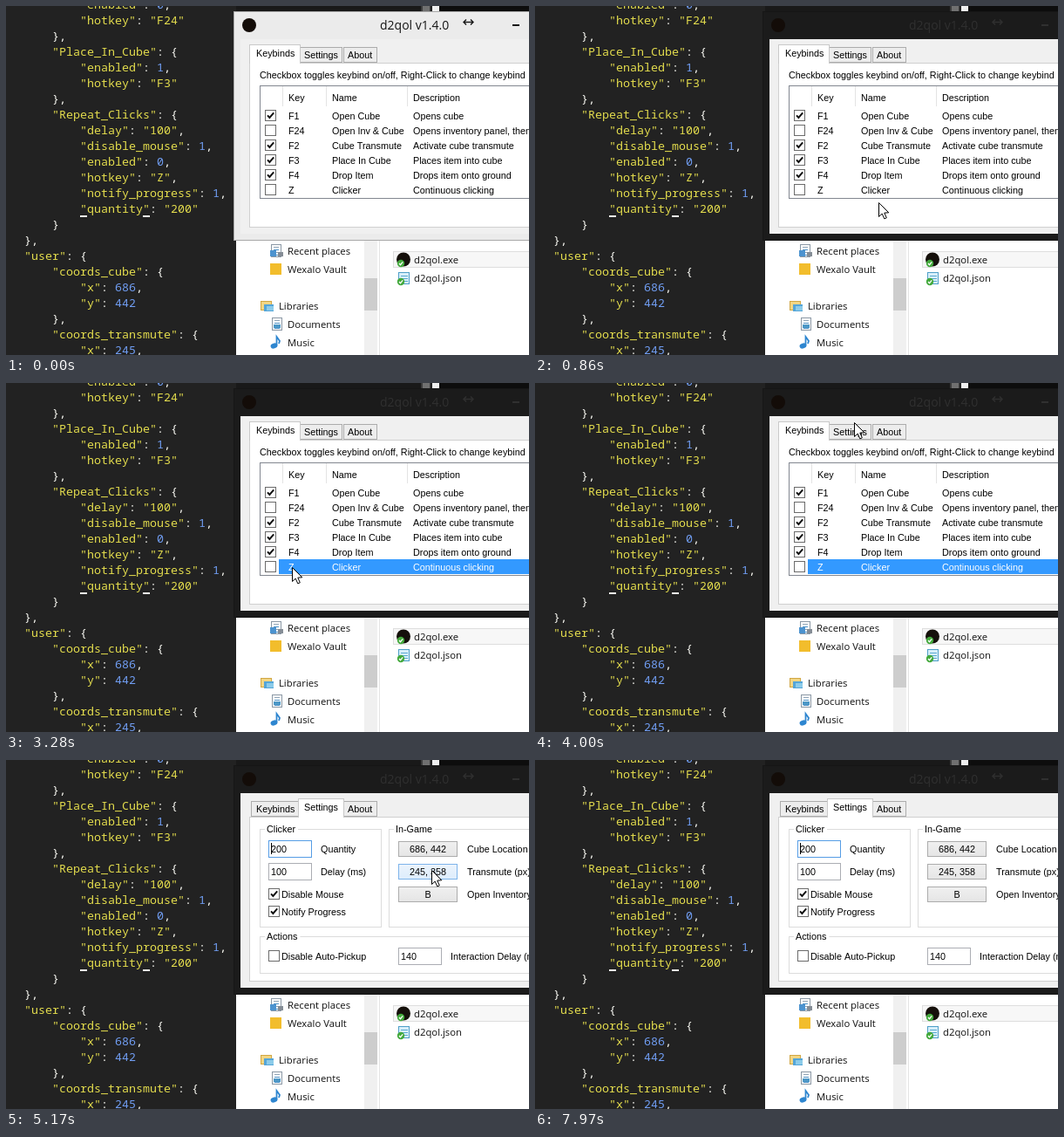
An HTML page with a canvas for the animation above (8 s loop, 600 by 400 pixels).

```html
<!DOCTYPE html>
<html lang="en">
<head>
<meta charset="utf-8">
<title>Keybind settings demo</title>
<style>
html, body { margin: 0; width: 100%; height: 100%; overflow: hidden; background: #222; }
canvas { display: block; width: 600px; height: 400px; }
</style>
</head>
<body>
<canvas id="stage"></canvas>
<script>
const LOOP = 8000;
const canvas = document.getElementById('stage');
const ctx = canvas.getContext('2d');
const dpr = window.devicePixelRatio || 1;
canvas.width = 600 * dpr;
canvas.height = 400 * dpr;

const MONO = '13.333px "Noto Sans Mono", "DejaVu Sans Mono", monospace';
const UI = '10.8px "Liberation Sans", Arial, sans-serif';
const SHELL = '11.3px "Open Sans", "Noto Sans", sans-serif';
const TITLE = '14px "Open Sans", "Noto Sans", sans-serif';

const CODE = `        "enabled": 0,
        "hotkey": "F24"
    },
    "Place_In_Cube": {
        "enabled": 1,
        "hotkey": "F3"
    },
    "Repeat_Clicks": {
        "delay": "100",
        "disable_mouse": 1,
        "enabled": 0,
        "hotkey": "Z",
        "notify_progress": 1,
        "quantity": "200"
    }
},
"user": {
    "coords_cube": {
        "x": 686,
        "y": 442
    },
    "coords_transmute": {
        "x": 245,`.split('\n');

const ROWS = [
  [1, 'F1', 'Open Cube', 'Opens cube'],
  [0, 'F24', 'Open Inv & Cube', 'Opens inventory panel, then closes'],
  [1, 'F2', 'Cube Transmute', 'Activate cube transmute'],
  [1, 'F3', 'Place In Cube', 'Places item into cube'],
  [1, 'F4', 'Drop Item', 'Drops item onto ground'],
  [0, 'Z', 'Clicker', 'Continuous clicking'],
];

// Pointer path: time, x, y
const PATH = [
  [40, 592, 392], [250, 500, 322], [600, 394, 225],
  [1110, 394, 225], [1180, 386, 219],
  [1440, 386, 219], [1820, 332, 212],
  [2520, 332, 212], [2690, 346, 214],
  [2830, 346, 214], [3020, 328, 211],
  [3670, 328, 211], [3850, 352, 122], [4000, 366, 45],
  [4150, 366, 45], [4260, 402, 50],
  [4480, 402, 50], [4700, 368, 55],
  [4930, 368, 55], [5060, 430, 92], [5170, 488, 126],
  [5220, 488, 126], [5400, 496, 125], [5580, 478, 120], [5770, 502, 108],
  [5820, 504, 106], [5940, 509, 101], [6160, 466, 99],
  [6270, 466, 99], [6340, 468, 101],
  [6980, 468, 101], [7300, 520, 76], [7660, 578, 41],
  [7810, 578, 41], [7930, 600, 39],
];
const CARET_TOGGLES = [4800, 5330, 5860, 6390, 6950, 7450, 7970];

function pointerAt(t) {
  if (t < 40 || t >= 7930) return null;
  const i = PATH.findIndex(p => p[0] > t);
  const a = PATH[i - 1], b = PATH[i];
  const k = (t - a[0]) / (b[0] - a[0]);
  return [Math.round(a[1] + (b[1] - a[1]) * k), Math.round(a[2] + (b[2] - a[2]) * k)];
}

function fill(x, y, w, h, color) {
  ctx.fillStyle = color;
  ctx.fillRect(x, y, w, h);
}

function frame(x, y, w, h, color) {
  ctx.strokeStyle = color;
  ctx.lineWidth = 1;
  ctx.strokeRect(x + .5, y + .5, w - 1, h - 1);
}

function box(x, y, w, h, color, edge) {
  fill(x, y, w, h, color);
  frame(x, y, w, h, edge);
}

function text(str, x, y, color = '#000', font = UI, align = 'left') {
  ctx.font = font;
  ctx.textAlign = align;
  ctx.fillStyle = color;
  ctx.fillText(str, x, y);
}

function disc(x, y, r, color) {
  ctx.fillStyle = color;
  ctx.beginPath();
  ctx.arc(x, y, r, 0, Math.PI * 2);
  ctx.fill();
}

function line(points, color, width = 1) {
  ctx.strokeStyle = color;
  ctx.lineWidth = width;
  ctx.beginPath();
  points.forEach(([x, y], i) => i ? ctx.lineTo(x, y) : ctx.moveTo(x, y));
  ctx.stroke();
}

function inside(p, x, y, w, h) {
  return p && p[0] >= x && p[0] < x + w && p[1] >= y && p[1] < y + h;
}

function drawEditor() {
  fill(0, 0, 600, 400, '#222222');
  CODE.forEach((row, i) => {
    for (const m of row.matchAll(/"[^"]*"|\d+|[^\s"\d]+/g)) {
      const color = m[0][0] === '"' ? '#e3dc4d' : /\d/.test(m[0]) ? '#709df2' : '#f8f8f2';
      text(m[0], 21 + m.index * 8, 3 + i * 18, color, MONO);
    }
  });
  fill(85, 240, 8, 2, '#f8f8f2');
  fill(157, 240, 8, 2, '#f8f8f2');
  fill(264, 0, 212, 7, '#191919');
  fill(476, 0, 11, 7, '#3c3c3c');
  fill(478, 0, 8, 6, '#707070');
  fill(489, 0, 8, 7, '#f0f0f0');
  fill(497, 0, 103, 7, '#0d0d0d');
}

function syncBadge(x, y) {
  disc(x, y, 4.2, '#43a93c');
  line([[x - 2, y], [x - .5, y + 1.7], [x + 2.2, y - 1.7]], '#fff', 1.2);
}

function sheet(x, y) {
  box(x, y, 12, 15, '#fdfdfd', '#8b98a5');
  for (let i = 0; i < 4; i++) fill(x + 3, y + 3 + i * 3, 6, 1, i % 2 ? '#4f94c9' : '#90a4b5');
}

function drawExplorer() {
  fill(264, 268, 336, 132, '#fff');
  fill(411, 268, 15, 132, '#f0f0f0');
  fill(411, 312, 15, 37, '#cdcdcd');
  fill(428, 268, 1, 132, '#e4e4e4');
  box(444, 281, 160, 19, '#f7f7f7', '#dedede');

  sheet(304, 273);
  fill(303, 280, 7, 7, '#4c93cf');
  fill(312, 282, 6, 5, '#858d96');
  fill(303, 295, 13, 13, '#f2bd2c');
  box(292, 338, 13, 11, '#f3d684', '#d1a744');
  fill(296, 342, 11, 8, '#54a5d8');
  fill(299, 344, 8, 5, '#8ccbe9');
  sheet(305, 357);
  fill(307, 365, 8, 4, '#4d98c7');
  ctx.fillStyle = '#2e86d0';
  ctx.beginPath();
  ctx.ellipse(307.5, 389.5, 4, 3, -.3, 0, Math.PI * 2);
  ctx.fill();
  line([[310.5, 389], [310.5, 379], [314, 384], [313, 387]], '#2e86d0', 1.8);

  disc(456, 290.5, 8, '#15100b');
  syncBadge(453, 295);
  box(450, 305, 13, 14, '#d8effb', '#4f9fc8');
  for (let y = 309; y < 317; y += 3) fill(453, y, 8, 1, '#5baad0');
  syncBadge(453, 316);

  const labels = [
    ['Recent places', 323, 285], ['Wexalo Vault', 323, 306], ['Libraries', 313, 348],
    ['Documents', 323, 369], ['Music', 323, 390], ['d2qol.exe', 468, 295], ['d2qol.json', 468, 316],
  ];
  labels.forEach(([s, x, y]) => text(s, x, y, '#111', SHELL));
}

function drawWindow(dark) {
  const ink = dark ? '#303030' : '#151515';
  box(261, 6, 345, 263, dark ? '#1b1b1b' : '#ebebeb', dark ? '#161616' : '#a8a8a8');
  disc(279, 22, 8, '#130c08');
  text('d2qol v1.4.0', 429, 27, ink, TITLE);
  line([[526, 18.5], [535, 18.5]], ink, 1.4);
  line([[528, 15.5], [525, 18.5], [528, 21.5]], ink, 1.4);
  line([[533, 15.5], [536, 18.5], [533, 21.5]], ink, 1.4);
  fill(581, 21, 8, 2, ink);
  fill(269, 38, 331, 223, '#f0f0f0');
  box(279, 65, 330, 189, '#fff', '#d0d0d0');
}

function tab(label, x, w, tx, active, hot) {
  if (active) {
    box(x - 2, 44, w + 4, 22, '#fff', '#c9c9c9');
    fill(x - 1, 65, w + 2, 1, '#fff');
  } else {
    box(x, 47, w, 18, hot ? '#e1f0fc' : '#ededed', hot ? '#7eb4ea' : '#acacac');
  }
  text(label, tx, active ? 58 : 60);
}

function drawTabs(settings, p) {
  const tabs = [['Keybinds', 281, 55, 287], ['Settings', 337, 49, 342], ['About', 387, 39, 392]];
  const active = settings ? 1 : 0;
  const paint = i => {
    const [s, x, w, tx] = tabs[i];
    tab(s, x, w, tx, i === active, inside(p, x, 47, w, 18));
  };
  tabs.forEach((_, i) => { if (i !== active) paint(i); });
  paint(active);
}

function checkbox(x, y, on) {
  box(x, y, 13, 13, '#fff', '#6b6b6b');
  if (on) line([[x + 3, y + 6.3], [x + 5.4, y + 9], [x + 10.2, y + 3.4]], '#111', 2);
}

function drawKeybinds(selected) {
  text('Checkbox toggles keybind on/off, Right-Click to change keybind', 291, 83);
  box(291, 91, 320, 130, '#fff', '#828790');
  [317, 367, 460].forEach(x => fill(x, 92, 1, 23, '#e3e3e3'));
  text('Key', 324, 109);
  text('Name', 374, 109);
  text('Description', 467, 109);
  ROWS.forEach(([on, key, name, about], i) => {
    const y = 117 + i * 17;
    const lit = selected && i === 5;
    if (lit) fill(313, y, 287, 17, '#3399ff');
    const ink = lit ? '#fff' : '#000';
    checkbox(297, y + 2, on);
    text(key, 324, y + 13, ink);
    text(name, 374, y + 13, ink);
    text(about, 467, y + 13, ink);
  });
}

function group(label, x, y, w, h) {
  frame(x, y, w, h, '#dcdcdc');
  ctx.font = UI;
  fill(x + 6, y - 2, ctx.measureText(label).width + 5, 5, '#fff');
  text(label, x + 8, y + 4);
}

function field(value, x, y, focus) {
  box(x, y, 50, 20, '#fff', focus ? '#569de5' : '#abadb3');
  text(value, x + 3, y + 14);
}

function button(label, y, p) {
  const hot = inside(p, 450, y, 68, 18);
  const shade = ctx.createLinearGradient(0, y, 0, y + 18);
  shade.addColorStop(0, hot ? '#ecf4fc' : '#f0f0f0');
  shade.addColorStop(1, hot ? '#dcecfc' : '#e5e5e5');
  box(450, y, 68, 18, shade, hot ? '#7eb4ea' : '#acacac');
  text(label, 484, y + 13, '#000', UI, 'center');
}

function drawSettings(t, p) {
  group('Clicker', 291, 79, 140, 113);
  group('In-Game', 439, 79, 180, 113);
  group('Actions', 291, 202, 330, 43);
  field('200', 301, 92, true);
  field('100', 301, 118);
  field('140', 450, 215);
  if (CARET_TOGGLES.filter(c => c <= t).length % 2) fill(304, 95, 1, 13, '#000');
  checkbox(301, 147, 1);
  checkbox(301, 167, 1);
  checkbox(301, 218, 0);
  button('686, 442', 93, p);
  button('245, 358', 119, p);
  button('B', 145, p);
  const labels = [
    ['Quantity', 361, 106], ['Delay (ms)', 361, 132], ['Disable Mouse', 316, 158],
    ['Notify Progress', 316, 178], ['Disable Auto-Pickup', 316, 229],
    ['Cube Location (px)', 529, 106], ['Transmute (px)', 529, 132],
    ['Open Inventory', 529, 158], ['Interaction Delay (ms)', 510, 229],
  ];
  labels.forEach(([s, x, y]) => text(s, x, y));
}

function drawPointer([x, y]) {
  const shape = [[0, 0], [0, 16], [3.7, 12.6], [6.3, 18.4], [8.8, 17.3], [6.3, 11.6], [11.3, 11.3]];
  ctx.beginPath();
  shape.forEach(([dx, dy]) => ctx.lineTo(x + .5 + dx, y + .5 + dy));
  ctx.closePath();
  ctx.fillStyle = '#fff';
  ctx.fill();
  ctx.strokeStyle = '#000';
  ctx.lineWidth = 1;
  ctx.stroke();
}

function draw(t) {
  const p = pointerAt(t);
  const settings = t >= 4800;
  ctx.setTransform(dpr, 0, 0, dpr, 0, 0);
  drawEditor();
  drawExplorer();
  drawWindow(t >= 860);
  drawTabs(settings, p);
  if (settings) drawSettings(t, p);
  else drawKeybinds(t >= 3280);
  if (p) drawPointer(p);
}

function tick() {
  draw(performance.now() % LOOP);
  requestAnimationFrame(tick);
}
tick();
</script>
</body>
</html>
```
